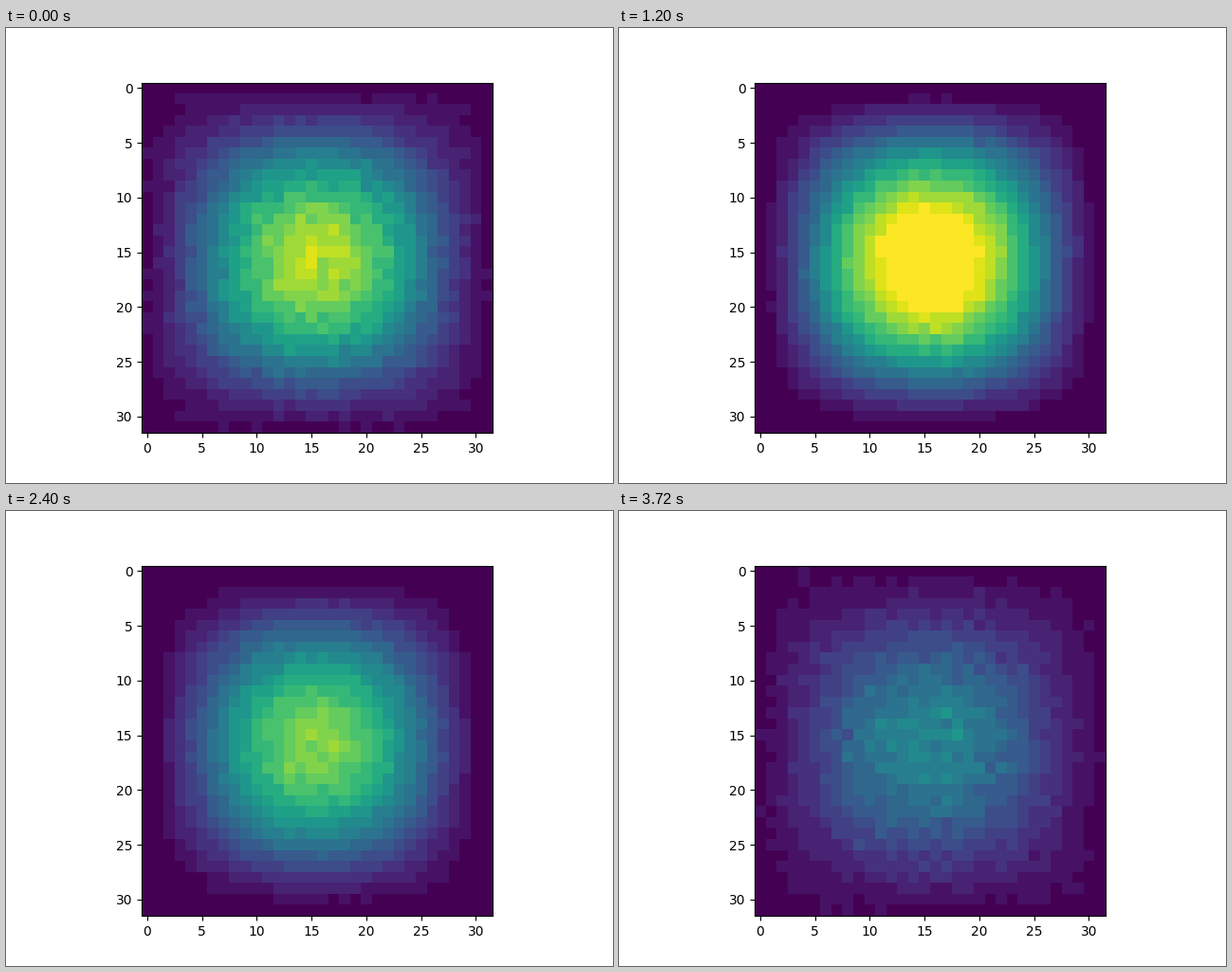
These frames come from a looping animation (640x480 px, 3840 ms). A matplotlib script:

```python
import numpy as np
import matplotlib.pyplot as plt
from matplotlib.animation import FuncAnimation

SIZE, FRAMES, INTERVAL = 32, 32, 120

rng = np.random.default_rng(16)
steady = rng.standard_normal((SIZE, SIZE))
fresh = rng.standard_normal((FRAMES, SIZE, SIZE))
noise = 0.6 * steady + 0.8 * fresh


def half_wave(shift=0.0):
    cells = np.arange(SIZE) + 0.5 - shift
    return np.sin(np.pi * cells / SIZE).clip(0)


shape = np.outer(half_wave(0.2), half_wave()) ** 1.45


def field(i):
    # A quick rise runs into a steady fade; both ends of the loop are hazier.
    centre = 1.43 - 0.031 * i - 0.55 * np.exp(-i / 1.8)
    haze = np.exp(-i / 2) + np.exp((i - FRAMES + 1) / 2)
    base = -0.012 + 0.04 * haze
    grain = (0.014 + 0.01 * haze) * shape + 0.004 + 0.004 * haze
    return base + (centre - base) * shape + grain * noise[i]


fig, ax = plt.subplots(figsize=(6.4, 4.8), dpi=100)
image = ax.imshow(field(0), cmap=plt.get_cmap("viridis", 22), vmin=0, vmax=1)


def update(i):
    image.set_data(field(i))
    return (image,)


anim = FuncAnimation(fig, update, frames=FRAMES, interval=INTERVAL,
                     repeat=True, repeat_delay=0)
plt.show()
```
